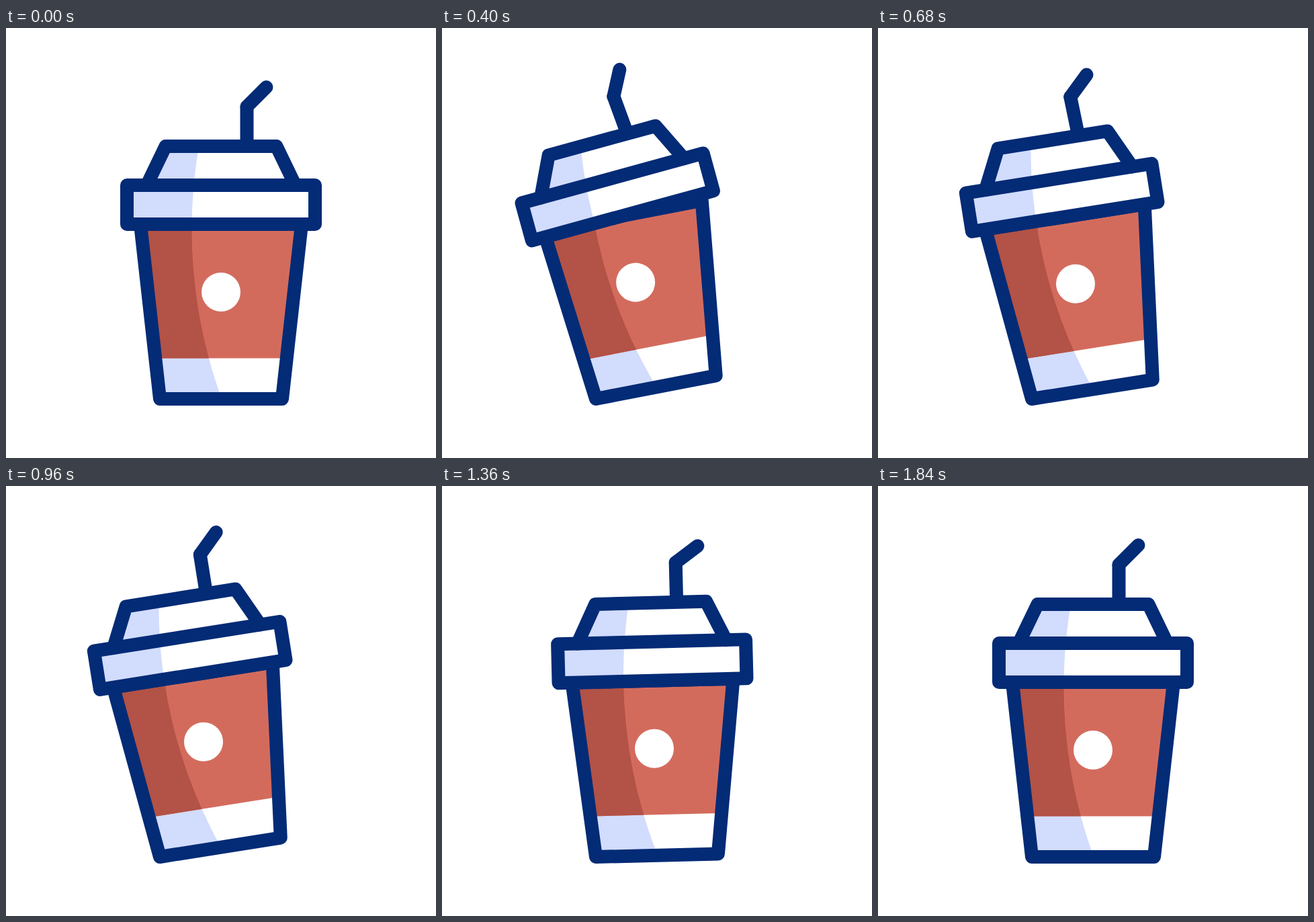
Animation of 640 by 640 pixels, one loop 1960 ms. Source, as an HTML page:

```html
<!DOCTYPE html>
<html lang="en">
<head>
<meta charset="utf-8">
<title>Tipping cup</title>
<style>
  html, body { margin: 0; width: 100%; height: 100%; overflow: hidden; background: #fff; }
  svg { display: block; width: 100%; height: 100%; }
  .line { fill: none; stroke: #032b76; stroke-width: 20; stroke-linecap: round; stroke-linejoin: round; }
</style>
</head>
<body>
<svg viewBox="0 0 640 640">
  <defs>
    <path id="shade" d="M150 160H290A735 735 0 0 0 321 552H150Z"/>
    <path id="cupShape" d="M200 292L229 552H411L440 292Z"/>
    <path id="domeShape" d="M209.5 234L237.5 176H402.5L430.5 234"/>
    <path id="rimShape" d="M180 234H460V292H180Z"/>
    <clipPath id="cupClip"><use href="#cupShape"/></clipPath>
    <clipPath id="lidClip"><use href="#domeShape"/><use href="#rimShape"/></clipPath>
    <clipPath id="sleeveClip"><path d="M150 280H490V491.5H150Z"/></clipPath>
  </defs>
  <g id="cup">
    <g clip-path="url(#cupClip)">
      <use href="#shade" fill="#d2dcfd"/>
      <g clip-path="url(#sleeveClip)">
        <path d="M150 280H490V500H150Z" fill="#d36b5d"/>
        <use href="#shade" fill="#b35246"/>
      </g>
    </g>
    <circle cx="320" cy="393" r="29" fill="#fff"/>
    <use href="#cupShape" class="line"/>
    <g id="lid">
      <g id="stem">
        <path class="line" d="M358.5 172V117"/>
        <path id="tip" class="line" d="M358.5 117L387.5 88"/>
      </g>
      <g clip-path="url(#lidClip)">
        <path d="M150 160H490V300H150Z" fill="#fff"/>
        <use href="#shade" fill="#d2dcfd"/>
      </g>
      <use href="#domeShape" class="line"/>
      <use href="#rimShape" class="line"/>
    </g>
  </g>
</svg>
<script>
  const LOOP = 1960, STEP = 40;

  const smooth = u => (1 - Math.cos(Math.PI * u)) / 2;
  const fall = u => u * u;
  const rise = u => u * (2 - u);

  // Each part turns about its pivot; keys are [ms, degrees, easing into the key].
  const parts = [
    { id: "cup", pivot: "229 552", keys: [
      [125, 0], [425, 11.15], [660, 9], [1042, 9], [1272, 0, fall],
      [1363, 1.42, rise], [1455, 0, fall], [1491, 0.23, rise], [1528, 0, fall]] },
    { id: "lid", pivot: "320 292", keys: [[235, 0], [410, 4.4], [610, 0]] },
    { id: "stem", pivot: "358.5 172", keys: [[220, 0], [410, 4.8], [1000, 0]] },
    { id: "tip", pivot: "358.5 117", keys: [
      [215, 0], [430, 13], [680, -3], [860, 1.5], [1000, 0], [1170, 9],
      [1370, -9.4], [1530, 5], [1690, -2.5], [1840, 0]] }
  ];
  for (const part of parts) part.node = document.getElementById(part.id);

  function angleAt(keys, t) {
    const next = keys.findIndex(key => key[0] > t);
    if (next <= 0) return keys[next ? keys.length - 1 : 0][1];
    const [t0, a0] = keys[next - 1];
    const [t1, a1, ease = smooth] = keys[next];
    return a0 + (a1 - a0) * ease((t - t0) / (t1 - t0));
  }

  function draw(now) {
    const t = Math.floor((now % LOOP) / STEP) * STEP;
    for (const { node, pivot, keys } of parts)
      node.setAttribute("transform", `rotate(${-angleAt(keys, t)} ${pivot})`);
  }

  const start = performance.now();
  function tick() {
    draw(performance.now() - start);
    requestAnimationFrame(tick);
  }
  tick();
</script>
</body>
</html>
```
